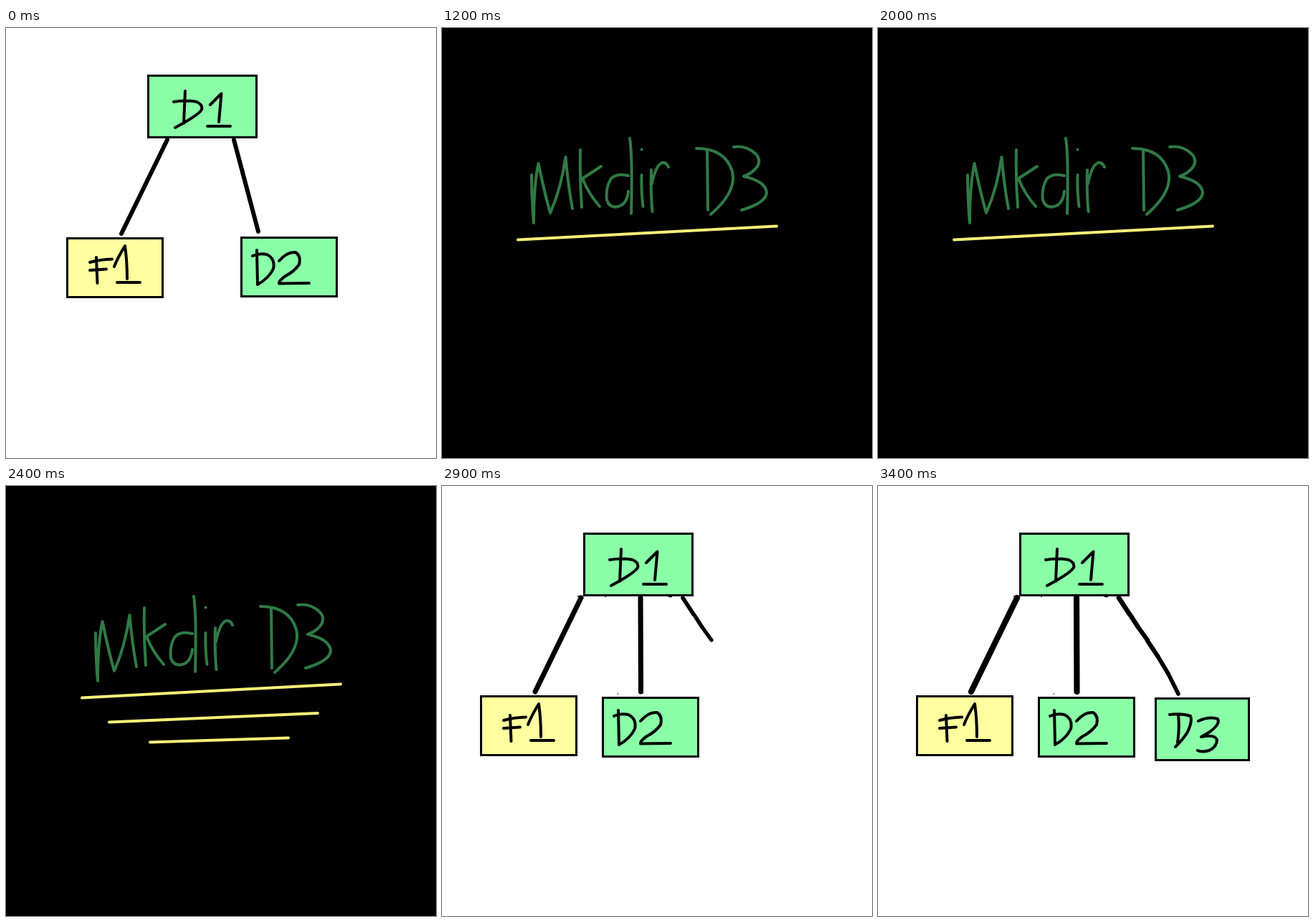
Recreate the animation shown at these times as an HTML page. Size 600 by 600 pixels, loop 4.4 s.

```html
<!DOCTYPE html>
<html lang="en">
<head>
<meta charset="utf-8">
<title>Making a directory</title>
<style>
  html, body { margin: 0; width: 100%; height: 100%; overflow: hidden; background: #fff; }
  svg { display: block; width: 100%; height: 100%; }
  path, line { fill: none; stroke: #000; stroke-linecap: round; stroke-linejoin: round; }
  rect { stroke: #000; stroke-width: 3; }
  .dir { fill: #8affa8; }
  .file { fill: #ffffa0; }
  .ink { stroke-width: 4; }
  .link { stroke-width: 6; }
  .command path { stroke: #307a46; stroke-width: 4; }
  .command line { stroke: #fbf078; stroke-width: 4; }
  .speck { stroke-width: 1.5; stroke-linecap: butt; }

  .before, .command, .after, .command line { animation: 4400ms step-end infinite; }
  .before { animation-name: before; }
  .command { animation-name: command; }
  .after { animation-name: after; }
  .command .u1 { animation-name: u1; }
  .command .u2 { animation-name: u2; }
  .command .u3 { animation-name: u3; }

  @keyframes before { 0% { opacity: 1 } 22.727%, 100% { opacity: 0 } }
  @keyframes command { 0%, 59.09%, 100% { opacity: 0 } 22.727% { opacity: 1 } }
  @keyframes after { 0% { opacity: 0 } 59.09%, 100% { opacity: 1 } }
  @keyframes u1 { 0%, 40.909% { opacity: 0 } 27.272%, 45.454%, 100% { opacity: 1 } }
  @keyframes u2 { 0%, 40.909% { opacity: 0 } 31.818%, 50%, 100% { opacity: 1 } }
  @keyframes u3 { 0%, 40.909% { opacity: 0 } 36.363%, 54.545%, 100% { opacity: 1 } }

  /* --at is the moment, in ms, when a part joins the new tree */
  .join, .grow { animation: 4400ms step-end calc(var(--at) * 1ms - 4400ms) infinite; }
  .join { animation-name: join; }
  .grow { --w: 6.4px; animation-name: join, grow; }
  .branch .grow { --w: 5.2px; }
  @keyframes join { 0% { opacity: 1 } 50%, 100% { opacity: 0 } }
  @keyframes grow {
    0% { stroke-width: var(--w); animation-timing-function: steps(8) }
    18.181%, 100% { stroke-width: calc(var(--w) + 1.8px) }
  }
</style>
</head>
<body>
<svg viewBox="0 0 600 600">
  <defs>
    <g id="f1">
      <rect class="file" x="85.5" y="293.5" width="133" height="82"/>
      <path class="ink" d="M126 320L127.500 356M117 327Q131 323 148 322.500M117 338L140 336.500
        M151 333Q155 322 166 304Q169 325 169 350M155 355H187"/>
    </g>
    <g id="d2">
      <rect class="dir" x="328.5" y="292.5" width="133" height="82"/>
      <path class="ink" d="M350 310L351 357M344 318Q353 314 364 316Q376 322 373 336Q367 349 351 358
        M381 325Q392 312 404 313Q412 318 409 330Q402 340 390 346Q381 352 381 356.500L423 356"/>
    </g>
  </defs>

  <rect class="dir" x="198.5" y="66.5" width="151" height="86"/>
  <path class="ink" d="M250 88L248 133M234 103Q252 100 266 103Q275 107 273 114Q268 122 236 139
    M285 107L300.500 91.500L297 131M281 137H313"/>

  <g class="before">
    <path class="link" d="M225 156L161 287M318 156L352 284"/>
    <use href="#f1"/>
    <use href="#d2"/>
  </g>

  <g class="after">
    <path class="speck" d="M189 154h8M227 154h2M316 154.500h5M245 290h1"/>
    <path class="grow" style="--at:2600" d="M194 156L130 287M277 156L277.500 287"/>
    <use href="#f1" x="-31"/>
    <use href="#d2" x="-104" y="3"/>
    <g class="branch">
      <path class="grow" style="--at:2700" d="M336 156L351 179"/>
      <path class="grow" style="--at:2800" d="M352 180L363 197"/>
      <path class="grow" style="--at:2900" d="M363 197L376 215"/>
      <path class="grow" style="--at:3000" d="M376 216L390 237"/>
      <path class="grow" style="--at:3100" d="M390 237L405 262"/>
      <path class="grow" style="--at:3200" d="M405 262L419 290"/>
    </g>
    <rect class="dir join" style="--at:3300" x="387.5" y="296.5" width="130" height="86"/>
    <path class="ink join" style="--at:3400" d="M407 319Q424 317 436 321Q439 328 432 343Q427 352 415 364
      M419 319Q421 338 418 358M447 328Q462 321 474 325Q478 332 463 343L451 350Q470 346 473 354Q473 364 462 369Q452 372 446 369"/>
  </g>

  <g class="command">
    <rect width="600" height="600" stroke="none" style="stroke:none"/>
    <path d="M125 205Q125 240 128 272Q128 220 134.500 189Q143 230 151 258Q166 225 172.500 180Q176 220 182 252
      M193 170Q192 210 195 250M222 193L196 210Q205 232 220 249
      M260 206Q244 202 236 210Q228 222 230 240Q234 252 246 249Q258 246 260 228M262 154Q266 180 264 259
      M278.500 169.500h.1M278.500 205Q278 230 280.500 249
      M292 198Q291 230 293.500 256M293 217Q298 192 307 188Q313 187 316 194
      M355 168Q395 168 405 200Q412 228 375 260M370 171L371 254
      M407 166Q425 163 438 176Q447 186 437 197Q430 204 421 207Q452 214 453 230Q452 244 418 254"/>
    <line class="u1" x1="106" y1="295.5" x2="467" y2="276.5"/>
    <line class="u2" x1="144" y1="329.5" x2="435" y2="317"/>
    <line class="u3" x1="201" y1="357.5" x2="394" y2="351.5"/>
  </g>
</svg>
</body>
</html>
```
